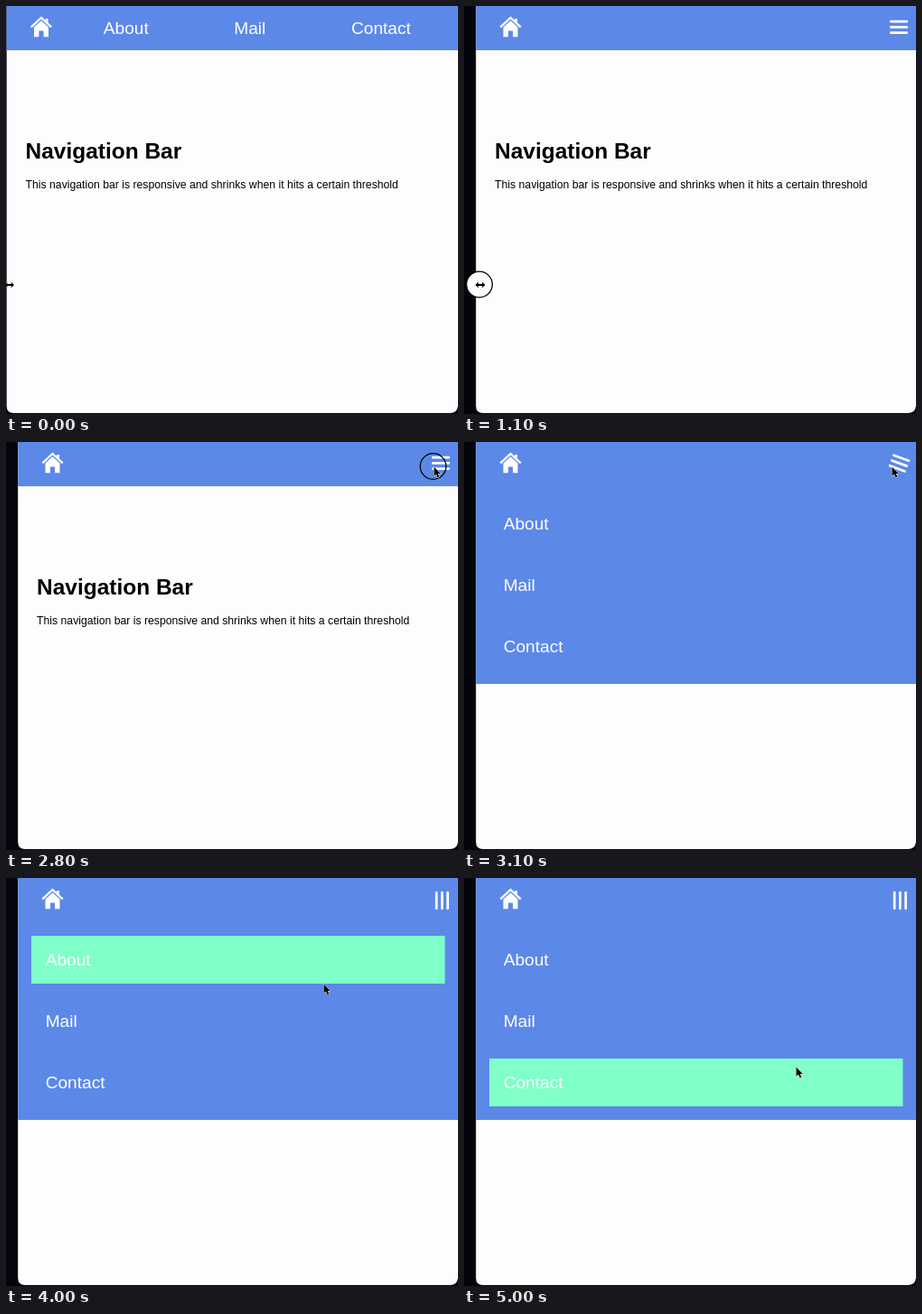
An HTML page for the animation above (5.1 s loop, 500 px wide and 452 px high).

```html
<!DOCTYPE html>
<html lang="en">
<head>
<meta charset="utf-8">
<title>Navigation Bar</title>
<style>
  html, body { margin: 0; width: 100%; height: 100%; overflow: hidden; background: #000; }
  svg { display: block; width: 500px; height: 452px; }
  text { font-family: "Liberation Sans", Arial, sans-serif; }
  .link { font-size: 19.1px; fill: #fff; }
</style>
</head>
<body>
<svg viewBox="0 0 500 452">
  <rect width="500" height="452" fill="#04040c"/>
  <path id="page" fill="#fdfdfd"/>
  <g id="copy">
    <text x="21.6" y="168.6" font-size="24.46" font-weight="700">Navigation Bar</text>
    <text x="21.6" y="201.6" font-size="12.23">This navigation bar is responsive and shrinks when it hits a certain threshold</text>
  </g>
  <rect id="bar" width="500" fill="#5c88e8"/>
  <g id="home" fill="#fff">
    <path d="M27.8 23.4L39 13L50.2 23.4" fill="none" stroke="#fff" stroke-width="2.3"/>
    <path d="M43.6 14h2.9v5l-2.9-2.6zM31 23.4L39 16.2L47 23.4V34.3H41.6V27.4H36.4V34.3H31Z"/>
  </g>
  <g id="wide">
    <text class="link" x="107.8" y="30.6">About</text>
    <text class="link" x="252.3" y="30.6">Mail</text>
    <text class="link" x="382" y="30.6">Contact</text>
  </g>
  <g id="menu"></g>
  <path id="burger" d="M472.2 17.2h17.6M472.2 23.4h17.6M472.2 29.6h17.6" stroke="#fff" stroke-width="2.7" stroke-linecap="round"/>
  <circle id="press" r="14.3" fill="#fdfdfd" stroke="#000" stroke-width="1.3"/>
  <path id="resize" d="M-5.5 0L-2.2 -3.2V-1H2.2V-3.2L5.5 0L2.2 3.2V1H-2.2V3.2Z" stroke="#fff" stroke-width="1" paint-order="stroke"/>
  <path id="arrow" d="M0 0V10.2L2.4 8L4.1 12L5.9 11.2L4.2 7.4H7.3Z" stroke="#fff" stroke-width="1" paint-order="stroke"/>
</svg>
<script>
const LOOP = 5100, STEP = 100;
const OPEN_AT = 3015, TURN = 500;
const NS = "http://www.w3.org/2000/svg";
const $ = id => document.getElementById(id);
const set = (el, attrs) => { for (const k in attrs) el.setAttribute(k, attrs[k]); };
const show = (el, on) => set(el, { visibility: on ? "visible" : "hidden" });
const clamp = v => Math.max(0, Math.min(1, v));
const mix = (a, b, p) => a + (b - a) * p;
const smooth = p => p * p * (3 - 2 * p);

function add(parent, tag, attrs) {
  const el = document.createElementNS(NS, tag);
  set(el, attrs);
  return parent.appendChild(el);
}

// Each row: label, hover start, hover end.
const rows = [["About", 3680, 4010], ["Mail", 4180, 4510], ["Contact", 4800, LOOP]]
  .map(([label, from, to], i) => {
    const y = 64 + 68 * i;
    const box = add($("menu"), "rect", { x: 28, y, width: 457.5, height: 53, fill: "#80ffc8" });
    const text = add($("menu"), "text", { class: "link", x: 43.7, y: y + 33.3 });
    text.textContent = label;
    return { from, to, box };
  });

// Pointer path: time, x, y.
const path = [
  [0, 3.5, 309], [600, 3.5, 309], [800, 7, 309], [1100, 18, 309], [1300, 18, 309],
  [1500, 60, 284], [1700, 190, 180], [1800, 290, 112], [1900, 377.5, 84],
  [2100, 440, 52], [2400, 473.5, 27.5], [3300, 473.5, 27.5], [3500, 448, 46],
  [3700, 398, 72], [4000, 351.5, 117.5], [4250, 358, 147], [4500, 365.5, 184.5],
  [4800, 368, 202], [5000, 367.5, 209.5], [5100, 367.5, 209.5]
];

function pointer(t) {
  const i = path.findIndex((p, n) => n && t <= p[0]);
  const [a, b] = [path[i - 1], path[i]];
  const p = (t - a[0]) / (b[0] - a[0]);
  return [mix(a[1], b[1], p), mix(a[2], b[2], p)];
}

// Slow-in, slow-out timing of the CSS "ease" curve.
function ease(x) {
  let lo = 0, hi = 1;
  const bez = (u, a, b) => 3 * u * (1 - u) * (1 - u) * a + 3 * u * u * (1 - u) * b + u ** 3;
  for (let n = 0; n < 20; n++) {
    const m = (lo + hi) / 2;
    if (bez(m, 0.25, 0.25) < x) lo = m; else hi = m;
  }
  return bez(lo, 0.1, 1);
}

function draw(t) {
  const shift = 12.5 * smooth(clamp((t - 800) / 300));
  const left = 0.7 + shift;
  const narrow = shift > 7;
  const open = t >= OPEN_AT;
  const move = { transform: `translate(${shift} 0)` };

  set($("page"), { d: `M${left} 0H500V443Q499 451 491 451H${left + 8}Q${left} 451 ${left} 443Z` });
  set($("bar"), { x: left, height: open ? 268 : 49 });
  for (const id of ["copy", "home", "wide"]) set($(id), move);
  show($("copy"), !open);
  show($("wide"), !narrow);
  show($("menu"), open);
  show($("burger"), narrow);
  const turn = 90 * ease(clamp((t - OPEN_AT) / TURN));
  set($("burger"), { transform: `rotate(${turn} 480.9 24.9)` });

  for (const r of rows) {
    const glow = clamp((t - r.from) / 150) * (1 - clamp((t - r.to) / 150));
    set(r.box, { "fill-opacity": glow });
  }

  const [x, y] = pointer(t);
  const sizing = t < 1300;
  const at = { transform: `translate(${x} ${y})` };
  show($("resize"), sizing);
  show($("arrow"), !sizing);
  set($("resize"), at);
  set($("arrow"), at);
  show($("press"), (t >= 600 && t < 1200) || (t >= 2800 && t < 3000));
  set($("press"), { cx: x - 1, cy: y - 0.5, "fill-opacity": sizing ? 1 : 0 });
}

function tick() {
  draw(Math.floor((performance.now() % LOOP) / STEP) * STEP);
  requestAnimationFrame(tick);
}
tick();
</script>
</body>
</html>
```
